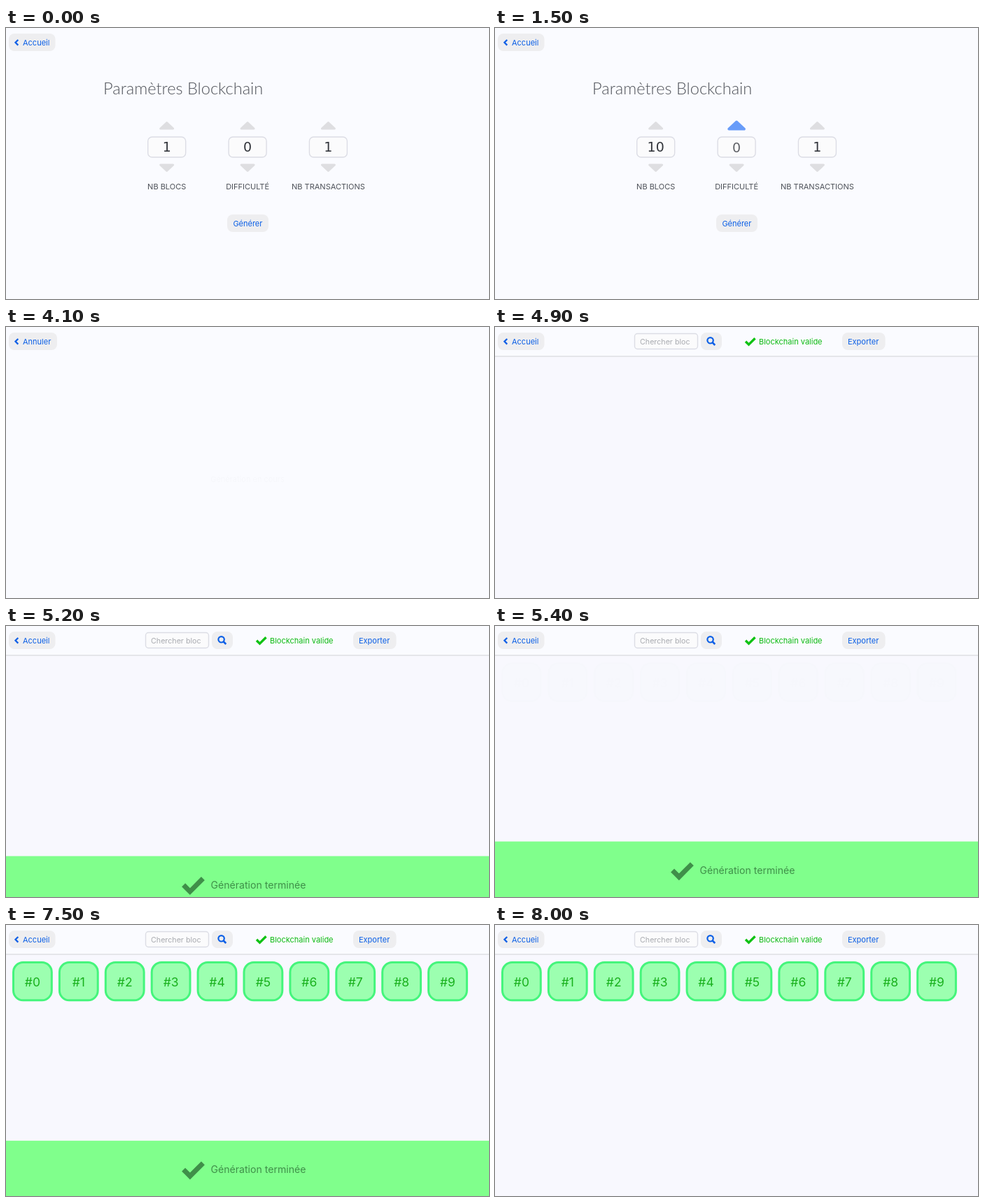
An HTML page that plays this animation: 690 px wide and 388 px high, repeating every 8100 ms.

```html
<!DOCTYPE html>
<html lang="fr">
<head>
<meta charset="utf-8">
<title>Paramètres Blockchain</title>
<style>
html, body { margin: 0; width: 100%; height: 100%; overflow: hidden; background: #fafbff; }
svg { display: block; }
text { font-family: Inter, "Open Sans", sans-serif; font-size: 11px; }
.title { font: 300 23.6px Lato, "Open Sans", sans-serif; fill: #50535a; }
.value { font: 19px "DejaVu Sans", Verdana, sans-serif; fill: #33363c; }
.label { fill: #4d5158; }
.mid { text-anchor: middle; }
.button { fill: #eeeef0; }
.link { fill: #0b5fe6; }
.field { fill: #fbfbfc; stroke: #dcdde5; stroke-width: 1.4; }
.arrow { stroke-width: 3; stroke-linejoin: round; }
.valid { fill: #0dba12; }
.block rect { fill: #9cffb0; stroke: #45f57c; stroke-width: 3; }
.block text { font-size: 17.5px; fill: #18b01c; }
.toast text { font-size: 14.1px; fill: #3f8f49; }
</style>
</head>
<body>
<svg id="stage" width="690" height="388" viewBox="0 0 690 388"></svg>
<script>
const LOOP = 8100;
const stage = document.getElementById("stage");

const clamp = x => Math.max(0, Math.min(1, x));
const ramp = (t, start, length) => clamp((t - start) / length);
const bezier = (a, b, u) => 3 * a * u * (1 - u) ** 2 + 3 * b * u * u * (1 - u) + u ** 3;

// Same curve as the CSS "ease" timing function.
function ease(x) {
  let low = 0, high = 1;
  for (let i = 0; i < 24; i++) {
    const u = (low + high) / 2;
    if (bezier(.25, .25, u) < x) low = u; else high = u;
  }
  return bezier(.1, 1, low);
}

const text = (x, y, content, cls, id = "") =>
  `<text x="${x}" y="${y}" class="${cls}" ${id && `id="${id}"`}>${content}</text>`;
const box = (x, y, w, h, r, cls, id = "") =>
  `<rect x="${x}" y="${y}" width="${w}" height="${h}" rx="${r}" class="${cls}" ${id && `id="${id}"`}/>`;
const check = (x, y, size, color) =>
  `<path d="M1.5 6.5 6 11 15 2" transform="translate(${x} ${y}) scale(${size})"
    fill="none" stroke="${color}" stroke-width="3.4"/>`;

const spinners = [
  { x: 229.7, label: "NB BLOCS", hover: [], typed: true, start: 1, clicks: [] },
  { x: 345.1, label: "DIFFICULTÉ", hover: [1150, 2250], start: 0, clicks: [1460, 1780, 2080] },
  { x: 460.4, label: "NB TRANSACTIONS", hover: [2400, 3230], start: 1, clicks: [2600, 2860, 3100] }
];

const spinner = ({ x, label }, i) => `
  <path id="up${i}" class="arrow" d="M-9 4.5 0 -4 9 4.5Z"/>
  <path class="arrow" d="M-9 -4 0 4.5 9 -4Z" transform="translate(${x} 200)" fill="#dedee1" stroke="#dedee1"/>
  ${box(x - 27, 156, 54, 29, 6, "field")}
  ${text(x, 177, "", "value mid", "value" + i)}
  ${text(x, 231, label, "label mid")}`;

const block = (_, i) => `<g class="block">
  ${box(10.5 + i * 65.9, 53.5, 54.8, 54.3, 14, "")}
  ${text(37.9 + i * 65.9, 87.5, "#" + i, "mid")}</g>`;

stage.innerHTML = `
  <rect width="690" height="388" fill="#fafbff"/>
  <g id="form">
    ${text(139, 94.5, "Paramètres Blockchain", "title")}
    ${spinners.map(spinner).join("")}
    ${box(316, 267, 59, 25, 8, "button")}
    ${text(345.4, 283.6, "Générer", "link mid")}
  </g>
  ${text(345, 222, "Génération en cours", "label mid", "loading")}
  <g id="result">
    <rect y="42" width="690" height="346" fill="#f8f8fe"/>
    <rect y="41.3" width="690" height="1.4" fill="#dcdde2"/>
    ${box(199.5, 9.5, 90, 22, 4, "field")}
    <text x="207" y="24.8" fill="#a9abb0" style="font-size:10.7px">Chercher bloc</text>
    ${box(294, 8, 30, 25, 8, "button")}
    <g fill="none" stroke="#0b5fe6" stroke-width="2.2">
      <circle cx="307.6" cy="19.3" r="4.2"/>
      <path d="M310.8 22.5 314.3 26" stroke-width="2.6"/>
    </g>
    ${check(356.5, 14.2, 1, "#10c214")}
    ${text(377, 24.8, "Blockchain valide", "valid")}
    ${box(496, 8, 61.5, 25, 8, "button")}
    ${text(504, 24.8, "Exporter", "link")}
    <g id="blocks">${Array.from({ length: 10 }, block).join("")}</g>
  </g>
  ${box(4, 8, 66.5, 25, 8, "button", "backBox")}
  <path d="M17.3 17 13.5 20.8 17.3 24.6" fill="none" stroke="#0b5fe6" stroke-width="2.3"/>
  ${text(24, 24.8, "", "link", "backText")}
  <g id="toast" class="toast">
    <rect width="690" height="84" fill="#80ff8c"/>
    ${check(250.5, 28, 2.06, "#3f8f49")}
    ${text(292.5, 46.5, "Génération terminée", "")}
  </g>`;

const part = id => document.getElementById(id);
const fade = (id, opacity) => {
  part(id).setAttribute("opacity", opacity);
  part(id).setAttribute("display", opacity > 0 ? "inline" : "none");
};
const mix = (from, to, p) => `rgb(${from.map((c, i) => Math.round(c + (to[i] - c) * p))})`;

function drawSpinner(s, i, t) {
  const [enter, leave] = s.hover;
  const hover = enter ? ease(ramp(t, enter, 200)) - ease(ramp(t, leave, 200)) : 0;
  const color = mix([222, 222, 225], [104, 156, 249], hover);
  const up = part("up" + i);
  up.setAttribute("transform", `translate(${s.x} ${139.5 - hover * .3}) scale(${1 + .22 * hover})`);
  up.setAttribute("fill", color);
  up.setAttribute("stroke", color);

  // The old digit sinks and fades, then the next one fades in.
  const past = s.clicks.filter(c => c <= t);
  const age = past.length ? t - past[past.length - 1] : Infinity;
  const leaving = age < 140;
  const shift = leaving ? age / 140 : 1 - ramp(age, 140, 100);
  const count = s.start + past.length - (leaving ? 1 : 0);
  const value = part("value" + i);
  value.textContent = s.typed && t >= 900 ? 10 : count;
  value.setAttribute("opacity", 1 - .8 * shift);
  value.setAttribute("y", 177 + (leaving ? 4 : -2) * shift);
}

function draw(t) {
  spinners.forEach((s, i) => drawSpinner(s, i, t));
  fade("form", 1 - ease(ramp(t, 3680, 350)));
  fade("loading", ease(ramp(t, 4090, 300)) - ease(ramp(t, 4480, 200)));
  fade("result", ease(ramp(t, 4600, 300)));
  fade("blocks", ease(ramp(t, 5400, 200)));

  const busy = t >= 3700 && t < 4600;
  part("backText").textContent = busy ? "Annuler" : "Accueil";
  part("backBox").setAttribute("width", busy ? 69 : 66.5);

  const shown = ease(ramp(t, 4950, 600)) - ease(ramp(t, 7470, 520));
  part("toast").setAttribute("transform", `translate(0 ${388 - 82.7 * shown})`);
  part("toast").setAttribute("display", shown > 0 ? "inline" : "none");
}

const begin = performance.now();
function tick() {
  draw((performance.now() - begin) % LOOP);
  requestAnimationFrame(tick);
}
tick();
</script>
</body>
</html>
```
